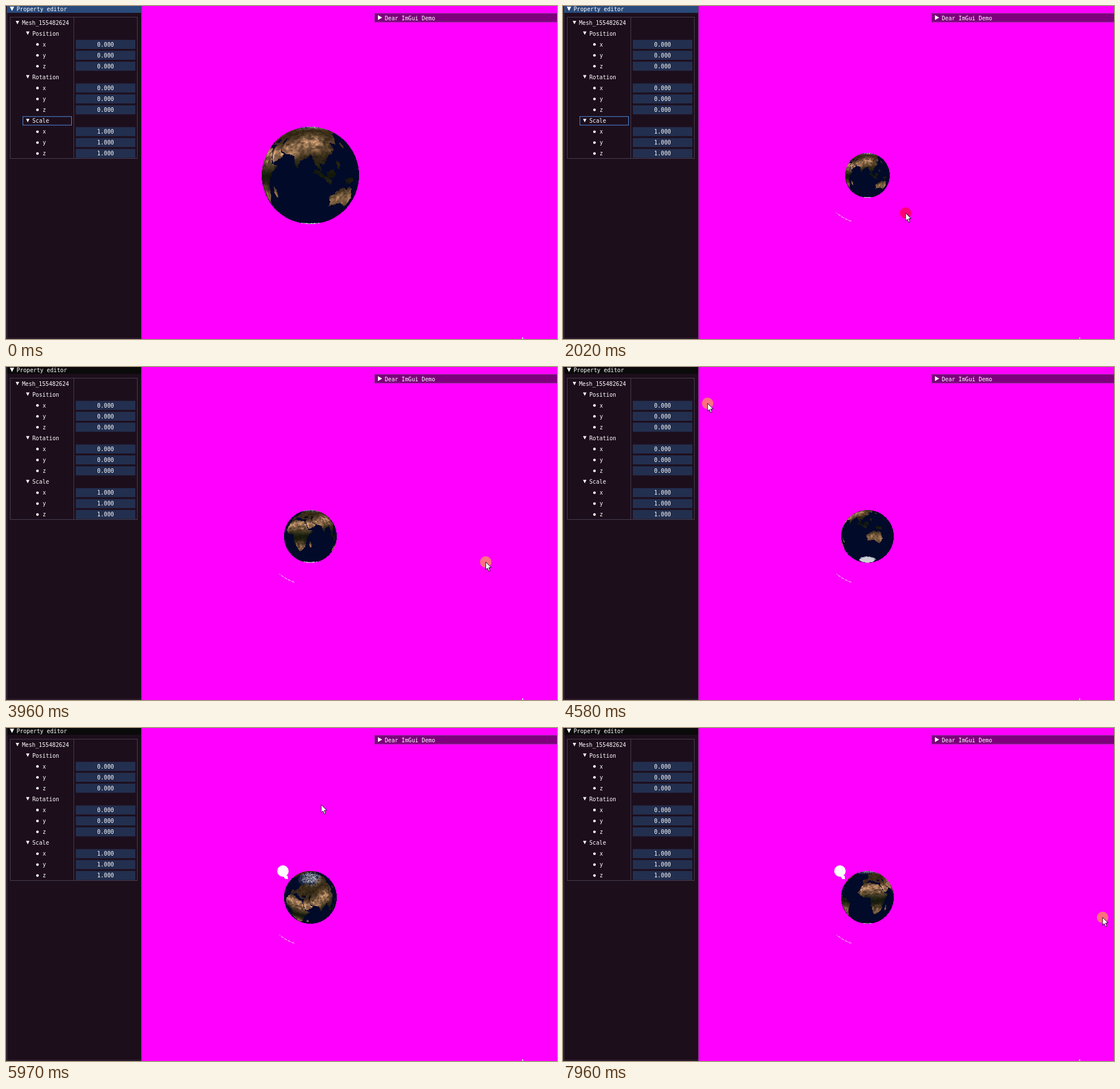
An HTML page with a canvas for the animation above (8000 ms loop, 963x582 px).

```html
<!DOCTYPE html>
<html lang="en">
<head>
<meta charset="utf-8">
<title>Property editor</title>
<style>
html, body { margin: 0; width: 100%; height: 100%; overflow: hidden; background: #f0f; }
canvas { display: block; }
</style>
</head>
<body>
<canvas id="stage" width="963" height="582"></canvas>
<script>
const W = 963, H = 582, LOOP = 8000;
const ctx = document.getElementById('stage').getContext('2d');

const clamp = (v, lo = 0, hi = 1) => Math.max(lo, Math.min(hi, v));
const mix = (a, b, f) => a.map((v, i) => v + (b[i] - v) * f);
const ramp = (v, from, to) => clamp((v - from) / (to - from));
const ease = f => f * f * (3 - 2 * f);
const between = (t, a, b) => t >= a && t < b;

function makeCanvas(w, h) {
  const c = document.createElement('canvas');
  c.width = w;
  c.height = h;
  return c.getContext('2d', { willReadFrequently: true });
}

function polygon(g, points) {
  g.beginPath();
  for (let i = 0; i < points.length; i += 2) g.lineTo(points[i], points[i + 1]);
  g.closePath();
  g.fill();
}

function ellipse(g, x, y, rx, ry = rx) {
  g.beginPath();
  g.ellipse(x, y, rx, ry, 0, 0, 7);
  g.fill();
}

// ---- Earth: rough outlines in longitude, latitude; noise roughens the coast ----
const TW = 720, TH = 360;
const continents = {
  eurasia: [-9,37, -9,43, 0,46, 8,55, 6,61, 25,71, 70,70, 105,77, 180,68, 160,58, 137,54, 127,36,
    119,38, 121,28, 109,19, 107,10, 101,13, 103,2, 98,9, 92,22, 80,15, 77,8, 72,20, 57,26, 49,30,
    59,22, 44,13, 35,29, 36,37, 24,38, 13,45, 17,39, 9,44, 0,38],
  africa: [-17,15, -6,36, 11,37, 32,31, 43,12, 51,11, 40,-4, 35,-24, 20,-35, 12,-17, 9,4, -8,5],
  australia: [114,-23, 130,-12, 136,-16, 142,-11, 153,-27, 148,-38, 131,-32, 116,-35],
  southAmerica: [-78,8, -50,1, -35,-7, -48,-27, -68,-54, -72,-18],
  northAmerica: [-165,66, -82,70, -56,52, -81,26, -97,18, -124,40],
};

function hash(x, y) {
  const v = Math.sin(x * 127.1 + y * 311.7) * 43758.5453;
  return v - Math.floor(v);
}

function noise(x, y) {
  const ix = Math.floor(x), iy = Math.floor(y), fx = ease(x - ix), fy = ease(y - iy);
  const row = j => hash(ix, j) + (hash(ix + 1, j) - hash(ix, j)) * fx;
  return row(iy) + (row(iy + 1) - row(iy)) * fy;
}

const fractal = (x, y) => noise(x, y) * .55 + noise(x * 2, y * 2) * .3 + noise(x * 4, y * 4) * .15;

function landMask() {
  const g = makeCanvas(TW, TH);
  g.setTransform(2, 0, 0, -2, 360, 180);
  Object.values(continents).forEach(points => polygon(g, points));
  ellipse(g, 114, 1, 5, 4);      // Borneo
  ellipse(g, 140, -5, 8, 3);     // New Guinea
  ellipse(g, 47, -19, 2.5, 6);   // Madagascar
  ellipse(g, 123, 12, 2, 5);     // Philippines
  ellipse(g, 138, 36, 2.5, 4);   // Japan
  for (let i = 0; i < 8; i++) ellipse(g, 97 + i * 2.3, 4 - i * 1.6, 2, 1.7);  // Sunda arc
  g.globalCompositeOperation = 'destination-out';
  ellipse(g, 35, 43, 6, 2);      // Black Sea
  ellipse(g, 51, 42, 2.5, 5);    // Caspian Sea
  return g.getImageData(0, 0, TW, TH).data;
}

// Dry belts are sandy, the equator is forest, the rest is brown.
function landColor(lon, lat, grain) {
  const belt = lat > 0 ? 23 + 15 * ramp(lon, 50, 85) : -25;
  const damp = lat > 0 ? 1 - .8 * ramp(lon, 100, 120) : .65;
  const dry = Math.exp(-(((lat - belt) / 12) ** 2)) * damp;
  const base = mix([20, 27, 11], [58, 45, 24], ramp(Math.abs(lat), 4, 24));
  return mix(base, [190, 145, 106], clamp(dry * (.3 + grain))).map(v => v * (.55 + .8 * grain));
}

function buildEarth() {
  const mask = landMask(), out = new Uint8ClampedArray(TW * TH * 3);
  for (let y = 0; y < TH; y++) {
    for (let x = 0; x < TW; x++) {
      const lon = x / 2 - 180, lat = 90 - y / 2;
      const grain = fractal(lon / 5, lat / 4), warp = fractal(lon / 3 + 50, lat / 3);
      const mx = clamp(Math.round(x + (warp - .5) * 8), 0, TW - 1);
      const my = clamp(Math.round(y + (grain - .5) * 8), 0, TH - 1);
      let color = mask[(my * TW + mx) * 4 + 3] > 127 ? landColor(lon, lat, grain) : [1, 10, 41];
      const ice = lat < 0 ? ramp(-lat, 69 + 5 * grain, 72 + 5 * grain)
        : ramp(lat, 62, 78) * ramp(grain, .2, .75);
      color = mix(color, [205, 208, 214], ice);
      out.set(color, (y * TW + x) * 3);
    }
  }
  return out;
}

const earth = buildEarth();
const GLOBE = 176, FOCAL = 702;
const globe = makeCanvas(GLOBE, GLOBE);

// Perspective view of a unit sphere whose outline has the given radius in pixels.
function drawGlobe(radius, lon, lat) {
  const image = globe.createImageData(GLOBE, GLOBE), out = image.data;
  const rad = Math.PI / 180, c = Math.cos(lat * rad), s = Math.sin(lat * rad);
  const distance = Math.hypot(1, FOCAL / radius);
  for (let py = 0; py < GLOBE; py++) {
    for (let px = 0; px < GLOBE; px++) {
      const dx = px + .5 - GLOBE / 2, dy = GLOBE / 2 - py - .5, r = Math.hypot(dx, dy);
      if (r > radius) continue;
      const ray = Math.atan(r / FOCAL);
      const angle = Math.asin(Math.min(1, distance * Math.sin(ray))) - ray;
      const x = Math.sin(angle) * dx / r, y = Math.sin(angle) * dy / r, z = Math.cos(angle);
      const pLat = Math.asin(clamp(y * c + z * s, -1, 1)) / rad;
      const pLon = lon + Math.atan2(x, z * c - y * s) / rad;
      const tx = Math.floor((pLon + 540) % 360 * 2);
      const ty = Math.min(TH - 1, Math.floor((90 - pLat) * 2));
      const from = (ty * TW + tx) * 3, to = (py * GLOBE + px) * 4;
      for (let k = 0; k < 3; k++) out[to + k] = earth[from + k];
      out[to + 3] = 255;
    }
  }
  globe.putImageData(image, 0, 0);
  ctx.drawImage(globe.canvas, 532 - GLOBE / 2, 296 - GLOBE / 2);
}

// ---- Motion ----
// The pointer's turning points: time, x, y
const path = [[70, 903, 579], [800, 498, 360], [1130, 498, 360], [1700, 645, 345],
  [2020, 599, 362], [2600, 465, 300], [2900, 628, 345], [3200, 566, 352], [3850, 955, 335],
  [4230, 556, 355], [4580, 253, 64], [4700, 218, 12], [4860, 484, 250], [5400, 688, 570],
  [5970, 551, 133], [6350, 545, 590], [7210, 524, 38], [7350, 520, -20]];

function pointerAt(t) {
  if (t >= 7550) return mix([561, 298], [943, 331], ramp(t, 7550, 7960));
  const i = path.findIndex(key => key[0] > t);
  if (i < 1) return (i ? path[path.length - 1] : path[0]).slice(1);
  const [a, b] = [path[i - 1], path[i]];
  return mix(a, b, ramp(t, a[0], b[0])).slice(1);
}

// Each drag turns the globe in proportion to the pointer's distance from an anchor.
const drags = [
  { start: 2650, anchor: [566, 352], view: [79, 0], gain: [.118, .09] },
  { start: 4860, anchor: [524, 38], view: [60, 0], gain: [.26, .44] },
  { start: 7550, anchor: [943, 331], view: [3, 5], gain: [.149, .15] },
];

function viewAt(t) {
  const [x, y] = pointerAt(t);
  return drags.reduce((view, { start, anchor, view: [lon, lat], gain }) => {
    const turned = [lon - gain[0] * (x - anchor[0]), clamp(lat + gain[1] * (y - anchor[1]), -40, 60)];
    if (start === 4860) turned[1] = Math.max(0, turned[1]);
    return mix(view, turned, ease(ramp(t, start, start + 300)));
  }, [91, 0]);
}

const radiusAt = t =>
  85 - 22 * ramp(t, 1130, 1610) - 24 * ramp(t, 1810, 2020) + 7 * ramp(t, 2300, 2500);

// ---- Interface ----
const BORDER = '#463e4e';

function rect(x, y, w, h, color) {
  ctx.fillStyle = color;
  ctx.fillRect(x, y, w, h);
}

function frame(x, y, w, h, color) {
  ctx.strokeStyle = color;
  ctx.lineWidth = 1;
  ctx.strokeRect(x + .5, y + .5, w, h);
}

function shape(points, color) {
  ctx.fillStyle = color;
  polygon(ctx, points);
}

function disc(x, y, r, color) {
  ctx.fillStyle = color;
  ellipse(ctx, x, y, r);
}

function label(text, x, y, align = 'left') {
  ctx.font = '9.75px "DejaVu Sans Mono", monospace';
  ctx.textAlign = align;
  ctx.fillStyle = '#fff';
  ctx.fillText(text, x, y + 3.5);
}

const arrowDown = (x, y, r = 3) => shape([x - r, y - r, x + r, y - r, x, y + r], '#fff');

function drawEditor(focused) {
  rect(0, 0, 237, H, '#1d0e1c');
  rect(1, 0, 1, H, BORDER);
  rect(2, 0, 234, 12, focused ? '#294a7a' : '#0a0a0a');
  rect(236, 0, 1, H, BORDER);
  rect(2, 580, 234, 1, '#35293a');
  arrowDown(10.5, 5, 3.8);
  label('Property editor', 18.5, 5);
  frame(7, 19, 222, 247, BORDER);
  rect(118, 20, 1, 247, BORDER);

  const rowY = i => 29 + 19.07 * i;
  arrowDown(20, rowY(0));
  label('Mesh_155482624', 28, rowY(0));
  ['Position', 'Rotation', 'Scale'].forEach((name, group) => {
    const y = rowY(1 + group * 4);
    arrowDown(38, y - .5);
    label(name, 46, y);
    ['x', 'y', 'z'].forEach((axis, k) => {
      const middle = rowY(2 + group * 4 + k);
      disc(55, middle, 2.3, '#fff');
      label(axis, 64, middle);
      rect(122, middle - 8, 104, 15.8, '#232f4f');
      label(name === 'Scale' ? '1.000' : '0.000', 174, middle, 'center');
    });
  });
  if (focused) frame(29, 192.7, 85, 15, '#4a8ee0');
}

function drawDemoBar() {
  rect(644, 13, 319, 15, '#7d007d');
  frame(644, 12.5, 330, 15, '#763780');
  shape([650, 16, 657.5, 20.3, 650, 24.6], '#fff');
  label('Dear ImGui Demo', 662, 21);
}

// Traces the globe and the pointer leave behind on the uncleared background.
function drawLeftovers(t) {
  rect(902, 579.5, 2, 2, '#fff');
  if (t > 1200) {
    ctx.strokeStyle = '#fff';
    ctx.setLineDash([5, 2]);
    ctx.beginPath();
    ctx.arc(532, 296, 85, 1.91, 2.26);
    ctx.stroke();
    ctx.setLineDash([]);
  }
  if (t > 4860) {
    disc(484, 250, 10, '#fff');
    shape([484, 258, 492, 258, 493, 264, 488, 264], '#fff');
  }
}

function drawPointer(t) {
  if (t < 70 || between(t, 7350, 7550)) return;
  const [x, y] = pointerAt(t);
  if (between(t, 1900, 2300)) disc(x, y, 10, '#ff0078');
  if (between(t, 2650, 4860) || t >= 7550) disc(x, y, 10, '#ff7080');
  ctx.save();
  ctx.translate(x, y);
  shape([0, 0, 0, 13.5, 3, 10.8, 5.4, 16.2, 7.6, 15.2, 5.3, 10, 9.5, 9.6], '#fff');
  ctx.strokeStyle = '#000';
  ctx.lineWidth = .9;
  ctx.stroke();
  ctx.restore();
}

function draw(now) {
  const t = now % LOOP;
  rect(0, 0, W, H, '#f0f');
  drawEditor(t < 2750);
  drawDemoBar();
  drawLeftovers(t);
  drawGlobe(radiusAt(t), ...viewAt(t));
  drawPointer(t);
  requestAnimationFrame(draw);
}

requestAnimationFrame(draw);
</script>
</body>
</html>
```
